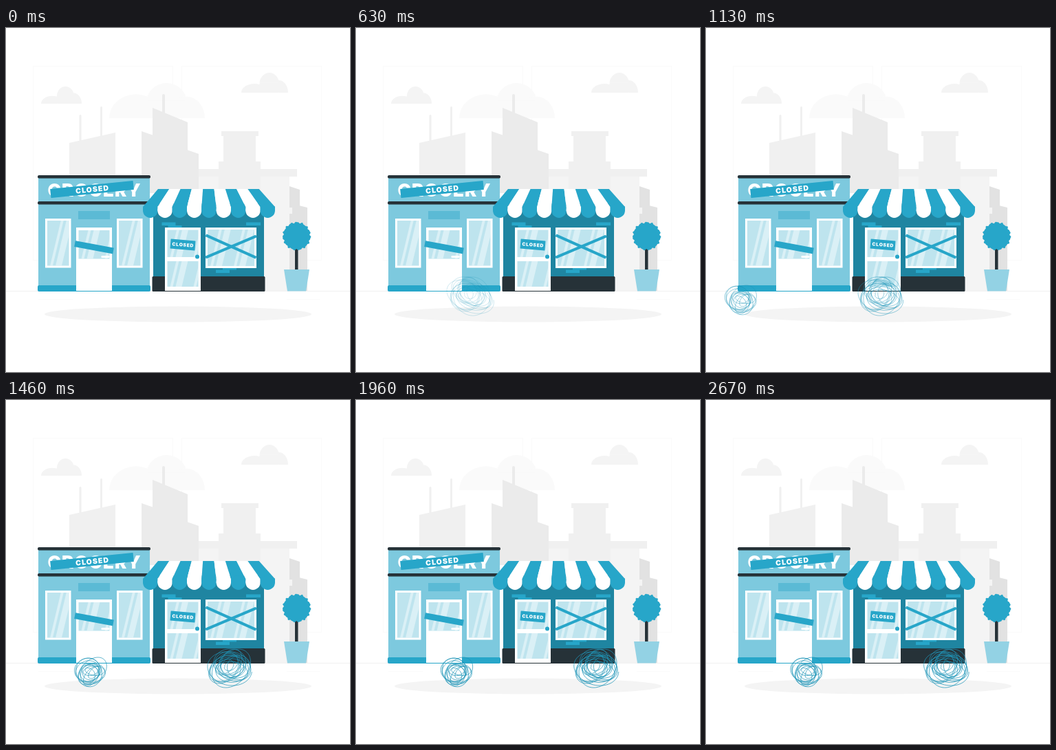
Animation of 500x500 px, one loop 2.71 s. Source, as an HTML page with a canvas:

```html
<!DOCTYPE html>
<html lang="en">
<head>
<meta charset="utf-8">
<title>Closed shops</title>
<style>
  html, body { margin: 0; width: 100%; height: 100%; overflow: hidden; background: #fff; }
  canvas { display: block; width: 500px; height: 500px; }
</style>
</head>
<body>
<canvas id="stage" width="500" height="500"></canvas>
<script>
const stage = document.getElementById('stage');
const LOOP = 2710, TAU = Math.PI * 2;
const BLUE = '#27a6c9', DEEP = '#1f85a1', PALE = '#7dc9de', GLASS = '#bee4ee', DARK = '#263238';
let ctx;

function rect(color, x, y, w, h, r = 0) {
  ctx.fillStyle = color;
  ctx.beginPath();
  ctx.roundRect(x, y, w, h, r);
  ctx.fill();
}

function ellipse(color, x, y, rx, ry = rx) {
  ctx.fillStyle = color;
  ctx.beginPath();
  ctx.ellipse(x, y, rx, ry, 0, 0, TAU);
  ctx.fill();
}

// Four-sided shape with level top and bottom edges.
function trapezoid(color, top, topLeft, topRight, bottom, left, right) {
  ctx.fillStyle = color;
  ctx.beginPath();
  ctx.moveTo(topLeft, top);
  ctx.lineTo(topRight, top);
  ctx.lineTo(right, bottom);
  ctx.lineTo(left, bottom);
  ctx.fill();
}

// Building with a sloping roof.
function tower(color, x, top, w, drop, base) {
  ctx.fillStyle = color;
  ctx.beginPath();
  ctx.moveTo(x, top);
  ctx.lineTo(x + w, top + drop);
  ctx.lineTo(x + w, base);
  ctx.lineTo(x, base);
  ctx.fill();
}

function clipped(x, y, w, h, draw) {
  ctx.save();
  ctx.beginPath();
  ctx.rect(x, y, w, h);
  ctx.clip();
  draw();
  ctx.restore();
}

function label(text, x, y, size, spacing) {
  ctx.font = `900 ${size}px Inter, sans-serif`;
  ctx.letterSpacing = spacing + 'px';
  ctx.textAlign = 'center';
  ctx.fillStyle = '#fff';
  ctx.fillText(text, x + spacing / 2, y + size * 0.364);
}

function plank(x, y, w, h, angle, text, size) {
  ctx.save();
  ctx.translate(x, y);
  ctx.rotate(angle);
  rect(BLUE, -w / 2, -h / 2, w, h, 0.5);
  if (text) label(text, 0, 0, size, size * 0.1);
  ctx.restore();
}

// Glass with a thin and a broad reflection every 34 px.
function pane(x, y, w, h) {
  rect(GLASS, x, y, w, h);
  const lean = h * 0.24, shine = 'rgba(255,255,255,.42)';
  clipped(x, y, w, h, () => {
    for (let left = x + 4; left < x + w; left += 34) {
      trapezoid(shine, y, left + lean, left + lean + 4, y + h, left, left + 4);
      trapezoid(shine, y, left + lean + 8, left + lean + 17, y + h, left + 8, left + 17);
    }
  });
}

function framedPane(x, y, w, h) {
  rect('#fff', x, y, w, h);
  pane(x + 3, y + 3, w - 6, h - 6);
}

function cloud(color, x, base, w, h, shoulder) {
  clipped(x, base - h, w, h, () => {
    ellipse(color, x + w * 0.28, base, w * 0.28, h * shoulder);
    ellipse(color, x + w * 0.6, base - h * 0.45, w * 0.21, h * 0.55);
    ellipse(color, x + w * 0.8, base, w * 0.2, h * 0.62);
    rect(color, x + w * 0.4, base - h * 0.5, w * 0.4, h * 0.5);
  });
}

function drawSky() {
  ctx.strokeStyle = '#fafafa';
  ctx.strokeRect(39.5, 55.5, 203, 282);
  ctx.strokeRect(255.5, 55.5, 203, 282);
  cloud('#fafafa', 150, 131, 139, 51, 0.68);
  cloud('#f4f4f4', 51, 110, 59, 25, 0.45);
  cloud('#f4f4f4', 342, 94, 68, 29, 0.45);
}

function drawCity() {
  const light = '#f0f0f0', mid = '#ebebeb', shade = '#e2e2e2';
  tower(light, 92, 167, 67, -15, 215);
  rect(light, 106.5, 126, 3, 40, 1.5);
  rect(light, 137, 114, 3, 46, 1.5);
  rect('#f4f4f4', 280, 212, 132, 170);
  rect(light, 280, 205, 143, 11);
  tower(mid, 197, 150, 17, 6, 240);
  tower(mid, 213, 116, 51, 21, 240);
  tower(mid, 263, 177, 17, 6, 240);
  rect(mid, 227, 96, 4, 35, 2);
  rect(light, 313, 150, 54, 7);
  rect(light, 316, 156, 47, 40);
  rect(light, 309, 194, 61, 44);
  tower(shade, 412, 230, 15, 5, 382);
  tower(shade, 426, 258, 12, 3, 382);
  rect('#f4f4f4', 411, 261, 5, 9);
}

function drawGround() {
  rect('#f1f1f1', 0, 382, 500, 1);
  rect('#fafafa', 47, 394, 50, 1);
  rect('#fafafa', 408, 394, 48, 1);
  ellipse('#f4f4f4', 250, 416, 194, 11.5);
}

function drawGrocery() {
  rect(PALE, 47, 217, 162, 160);
  rect(DARK, 46, 214, 164, 4.5, 2);
  rect(DARK, 46, 252, 164, 4.5, 2);
  rect(BLUE, 46, 374, 164, 9, 2);
  label('GROCERY', 128, 236, 26, 1);
  plank(125, 234.5, 121, 13, -0.1, 'CLOSED', 10.5);
  rect('#5bbad5', 105, 266, 46, 12);
  framedPane(57, 277, 37.5, 71.5);
  framedPane(161, 277, 37.5, 71.5);

  rect('#fff', 102, 290, 52, 92);
  pane(105.5, 294, 45, 41.5);
  rect('#fff', 138.5, 331, 12, 3, 1);
  plank(128, 318.8, 57, 9, 0.185);
}

function drawAwning() {
  const count = 9, topStep = 16.3, step = 192 / count;
  for (let i = 0; i < count; i++) {
    const left = 199 + i * step, right = left + step, top = 221 + i * topStep;
    const color = i % 2 ? '#fff' : BLUE;
    trapezoid(color, 234, top, top + topStep, 260, left, right);
    rect(color, left, 259.5, step, 6);
    ellipse(color, left + step / 2, 265.3, step / 2);
  }
}

function bricks(x, y, stagger) {
  rect(BLUE, x, y, 20, 4.5);
  rect(BLUE, x + stagger, y + 4.5, 20, 4.5);
}

function drawCornerShop() {
  rect(DEEP, 214, 255, 161, 108);
  rect(DARK, 212.5, 361, 164, 22, 1.5);
  bricks(226.5, 282.5, 9);
  bricks(315, 347, -10);
  rect(BLUE, 349, 282.5, 21, 4.5);

  rect('#fff', 231, 290, 52, 92);
  pane(234.5, 293.5, 45, 39.5);
  pane(234.5, 339, 45, 37);
  ellipse(BLUE, 278, 332.5, 3);
  plank(257, 315, 36, 14, 0.08, 'CLOSED', 6.8);

  framedPane(290, 290, 74, 59);
  plank(327, 317.5, 80, 4, 0.42);
  plank(327, 318, 80, 4, -0.4);
  drawAwning();
}

function drawTree() {
  rect(DARK, 420, 318, 4.5, 34);
  trapezoid('#93d2e4', 351, 404, 441, 382.5, 409, 436);
  ctx.fillStyle = BLUE;
  ctx.beginPath();
  for (let a = 0; a < TAU; a += 0.05) {
    const r = 20 + 0.8 * Math.sin(a * 15) + 0.5 * Math.sin(a * 26 + 1);
    ctx.lineTo(422.5 + r * Math.cos(a), 302.5 + r * Math.sin(a));
  }
  ctx.fill();
}

// A loose scribble whose radius, shape and centre drift while it winds round.
function scribble(rx, ry, turns, phase) {
  const path = new Path2D();
  for (let a = 0; a < turns * TAU; a += 0.1) {
    const r = 0.25 + 0.53 * Math.sqrt(0.5 + 0.5 * Math.sin(a * 0.31 + phase));
    const squash = 0.1 * Math.sin(a * 0.23 + phase);
    const x = r * (1 + squash) * Math.cos(a) + 0.2 * Math.cos(a * 0.43 + phase);
    const y = r * (1 - squash) * Math.sin(a + squash * 2) + 0.2 * Math.sin(a * 0.57 + phase);
    path.lineTo(x * rx, y * ry);
  }
  return path;
}

const weeds = [
  { x: 350, y: 388, path: scribble(34.5, 30, 16, 0.8) },
  { x: 147, y: 396, path: scribble(25.5, 23, 12, 2.1) }
];

// Inverts the curve cubic-bezier(.42, 0, 1, 1) by bisection.
function easeIn(x) {
  let low = 0, high = 1;
  for (let i = 0; i < 24; i++) {
    const s = (low + high) / 2;
    if (1.26 * s + 0.48 * s * s - 0.74 * s ** 3 < x) low = s; else high = s;
  }
  return low * low * (3 - 2 * low);
}

// Progress of a move that begins and ends at the given times.
function phase(t, begin, end) {
  return easeIn(Math.min(1, Math.max(0, (t - begin) / (end - begin))));
}

// Weeds rush in leaning back, then tip forward and settle.
function drawWeeds(t) {
  if (t < 210) return;
  const rush = phase(t, -135, 1560), rock = phase(t, 1560, 2125), settle = phase(t, 2125, 2690);
  const lean = 20 - 30 * rush + 12 * rock - 2 * settle;
  const skew = Math.tan(lean * Math.PI / 180);
  ctx.globalAlpha = rush;
  ctx.strokeStyle = '#2096b8';
  ctx.lineWidth = 0.75;
  for (const { x, y, path } of weeds) {
    ctx.save();
    ctx.translate(x - 250 * (1 - rush), y);
    ctx.transform(1, 0, skew, 1, 0, 0);
    ctx.stroke(path);
    ctx.restore();
  }
  ctx.globalAlpha = 1;
}

const scene = document.createElement('canvas');
scene.width = scene.height = 500;
ctx = scene.getContext('2d');
rect('#fff', 0, 0, 500, 500);
[drawSky, drawCity, drawGround, drawGrocery, drawCornerShop, drawTree].forEach(draw => draw());
ctx = stage.getContext('2d');

const start = performance.now();
function frame() {
  ctx.drawImage(scene, 0, 0);
  drawWeeds((performance.now() - start) % LOOP);
  requestAnimationFrame(frame);
}
frame();
</script>
</body>
</html>
```
